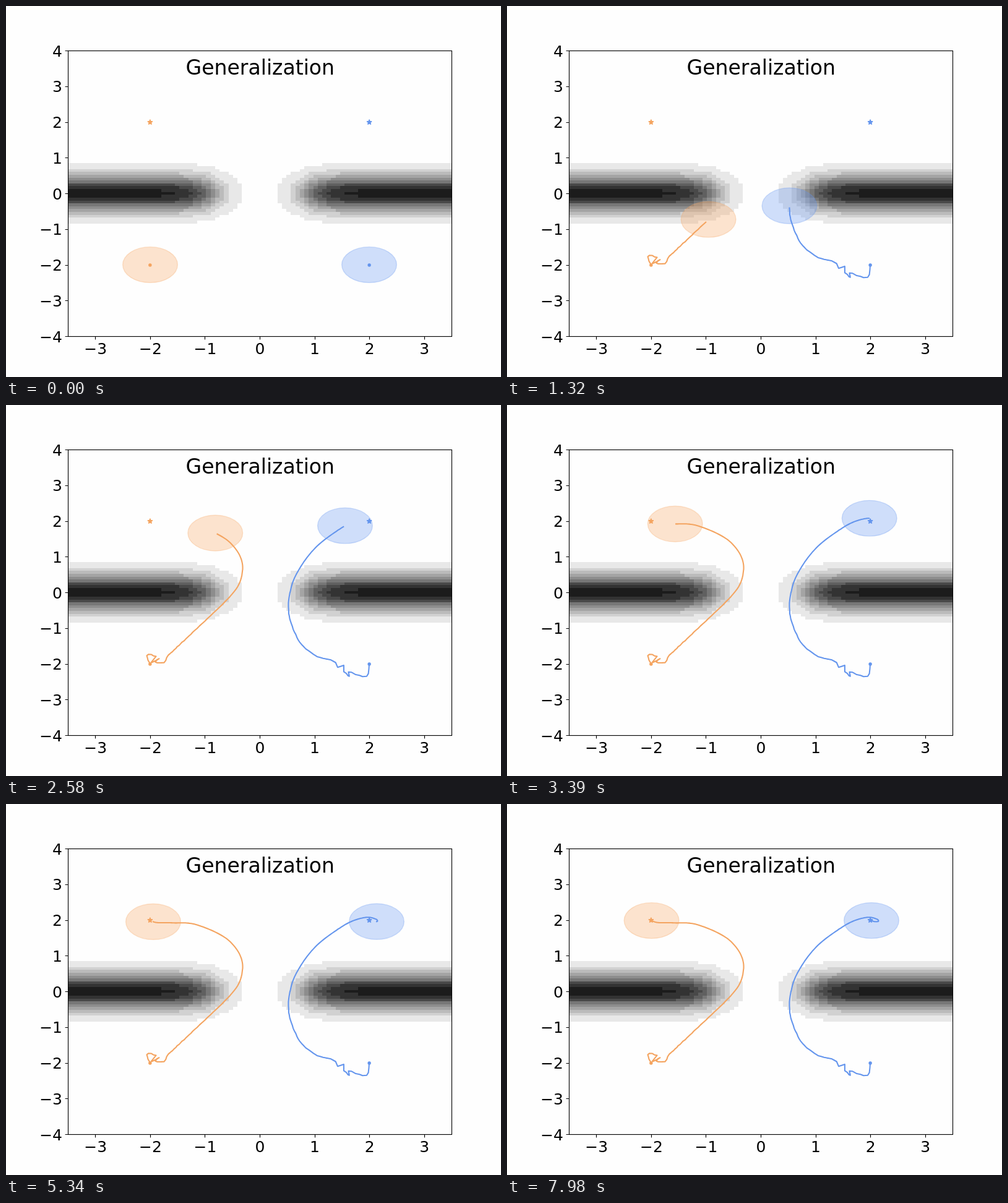
Recreate the animation shown at these times as an HTML page with a canvas. Size 800 by 600 pixels, loop 8 s.

```html
<!DOCTYPE html>
<html lang="en">
<head>
<meta charset="utf-8">
<title>Generalization</title>
<style>
html, body { margin: 0; width: 100%; height: 100%; overflow: hidden; background: #fefefe; }
canvas { display: block; }
</style>
</head>
<body>
<canvas id="stage" width="800" height="600"></canvas>
<script>
const ctx = document.getElementById('stage').getContext('2d');
const LOOP = 8000, STEP = 30, STEPS = 267;
const LEFT = 100, TOP = 72, W = 620, H = 462;
const UX = W / 7, UY = H / 8;
const px = x => LEFT + (x + 3.5) * UX;
const py = y => TOP + (4 - y) * UY;

// Key points: step, x, y. A spline joins them, with a fading jitter on top.
const agents = [
  {
    color: '#f4a460', x: -2, seed: 5,
    keys: [
      [0, 233, 418.5], [3, 227, 405], [7, 242, 406.5], [9, 235, 416], [14, 247.5, 410],
      [16, 241, 416], [19, 256, 416.5], [22, 260.5, 406], [26, 269, 398.5], [40, 309, 361],
      [54, 369, 301.5], [63, 382.2, 268.5], [72, 376.5, 241], [81, 354, 216], [96, 307, 195],
      [113, 271.7, 192.3], [142, 246.6, 192], [189, 236.8, 190], [266, 233.6, 188.5]
    ]
  },
  {
    color: '#6495ed', x: 2, seed: 9,
    keys: [
      [0, 587, 418.5], [3, 582, 439], [8, 553.5, 431.5], [9, 555, 438], [12, 546.5, 431],
      [13, 546, 421], [15, 536, 424], [16, 533, 416], [23, 503, 406.5], [26, 484.5, 394],
      [31, 470, 375.5], [40, 457, 337], [54, 462, 291], [63, 478.8, 257.5], [72, 503, 228],
      [81, 533.5, 204.5], [90, 557, 190.5], [108, 581.6, 183.4], [135, 597.3, 186],
      [162, 600.3, 189.6], [216, 594, 190.2], [266, 589, 188.5]
    ]
  }
];

function spline(keys, step) {
  let i = 0;
  while (i < keys.length - 2 && step > keys[i + 1][0]) i++;
  const a = keys[i], b = keys[i + 1], span = b[0] - a[0], u = (step - a[0]) / span;
  const slope = (k, c) => {
    const p = keys[Math.max(k - 1, 0)], q = keys[Math.min(k + 1, keys.length - 1)];
    return (q[c] - p[c]) / (q[0] - p[0]);
  };
  return [1, 2].map(c =>
    a[c] * (1 + 2 * u) * (1 - u) ** 2 + b[c] * u * u * (3 - 2 * u) +
    span * (slope(i, c) * u * (1 - u) ** 2 - slope(i + 1, c) * u * u * (1 - u)));
}

function random(seed) {
  return () => (seed = seed * 16807 % 2147483647) / 2147483647;
}

for (const agent of agents) {
  const rnd = random(agent.seed * 7919);
  agent.path = Array.from({ length: STEPS }, (_, step) => {
    const size = step ? 2.6 * Math.exp(-step / 25) : 0;
    return spline(agent.keys, step).map(v => v + size * (rnd() - 0.5));
  });
}

// Two walls with soft ends, in ten grey bands on a coarse grid.
function drawWalls(c) {
  const cw = W / 86, rh = 4.62, mid = py(0);
  for (let row = -12; row <= 12; row++) {
    const y = row * rh / UY;
    const top = Math.round(mid + (row - 0.5) * rh);
    const bottom = Math.round(mid + (row + 0.5) * rh);
    for (let col = 0; col < 86; col++) {
      const x = Math.abs((col + 0.5) * cw - W / 2) / UX;
      const v = Math.exp(-y * y / 0.24) / (1 + Math.exp(-1.702 * (x - 0.86) / 0.335));
      const band = Math.floor(1 + (v - 0.056) / 0.101);
      if (band < 1) continue;
      const g = Math.round(254.7 - 22.67 * band);
      const l = Math.round(LEFT + col * cw), r = Math.round(LEFT + (col + 1) * cw);
      c.fillStyle = `rgb(${g},${g},${g})`;
      c.fillRect(l, top, r - l, bottom - top);
    }
  }
}

function drawAxes(c) {
  c.strokeStyle = c.fillStyle = '#000';
  c.lineWidth = 1.11;
  c.strokeRect(LEFT + 0.5, TOP + 0.5, W, H);
  c.font = '25px "DejaVu Sans", sans-serif';
  c.textBaseline = 'alphabetic';
  const label = n => n < 0 ? '\u2212' + -n : String(n);
  c.beginPath();
  c.textAlign = 'center';
  for (let n = -3; n <= 3; n++) {
    const x = Math.round(px(n)) + 0.5;
    c.moveTo(x, TOP + H + 0.5);
    c.lineTo(x, TOP + H + 5.4);
    c.fillText(label(n), px(n) + 0.5, 563);
  }
  c.textAlign = 'right';
  for (let n = -4; n <= 4; n++) {
    const y = Math.round(py(n)) + 0.5;
    c.moveTo(LEFT + 0.5, y);
    c.lineTo(LEFT - 4.4, y);
    c.fillText(label(n), 91, Math.round(py(n) + 9.5));
  }
  c.stroke();
  c.textAlign = 'center';
  c.font = '33.1px "DejaVu Sans", sans-serif';
  c.fillText('Generalization', px(0) + 0.8, 111);
}

function layer(draw) {
  const cv = document.createElement('canvas');
  cv.width = 800;
  cv.height = 600;
  draw(cv.getContext('2d'));
  return cv;
}

function drawStar(x, y) {
  ctx.beginPath();
  for (let i = 0; i < 10; i++) {
    const r = i % 2 ? 1.59 : 4.17, a = i * Math.PI / 5;
    ctx.lineTo(x + r * Math.sin(a), y - r * Math.cos(a));
  }
  ctx.closePath();
  ctx.fill();
  ctx.lineWidth = 1.39;
  ctx.lineJoin = 'bevel';
  ctx.stroke();
}

function drawHalo({ color, path }, n) {
  ctx.globalAlpha = 0.31;
  ctx.fillStyle = ctx.strokeStyle = color;
  ctx.lineWidth = 1.39;
  ctx.beginPath();
  ctx.ellipse(...path[n], UX / 2, UY / 2, 0, 0, 2 * Math.PI);
  ctx.fill();
  ctx.stroke();
  ctx.globalAlpha = 1;
}

function drawTrail({ color, path, x }, n) {
  ctx.fillStyle = ctx.strokeStyle = color;
  ctx.beginPath();
  ctx.arc(px(x), py(-2) + 0.5, 2.7, 0, 2 * Math.PI);
  ctx.fill();
  drawStar(px(x), py(2) + 0.5);
  if (n < 2) return;
  // The line lags one step behind the halo.
  ctx.beginPath();
  for (let i = 0; i < n; i++) ctx.lineTo(...path[i]);
  ctx.lineWidth = 2.08;
  ctx.lineJoin = 'round';
  ctx.lineCap = 'square';
  ctx.stroke();
  ctx.lineCap = 'butt';
}

const walls = layer(drawWalls), axes = layer(drawAxes);

function render(now) {
  const n = Math.min(STEPS - 1, Math.floor((now % LOOP) / STEP));
  ctx.fillStyle = '#fefefe';
  ctx.fillRect(0, 0, 800, 600);
  ctx.drawImage(walls, 0, 0);
  for (const agent of agents) drawHalo(agent, n);
  for (const agent of agents) drawTrail(agent, n);
  ctx.drawImage(axes, 0, 0);
}

const start = performance.now();
function tick() {
  render(performance.now() - start);
  requestAnimationFrame(tick);
}
tick();
</script>
</body>
</html>
```
